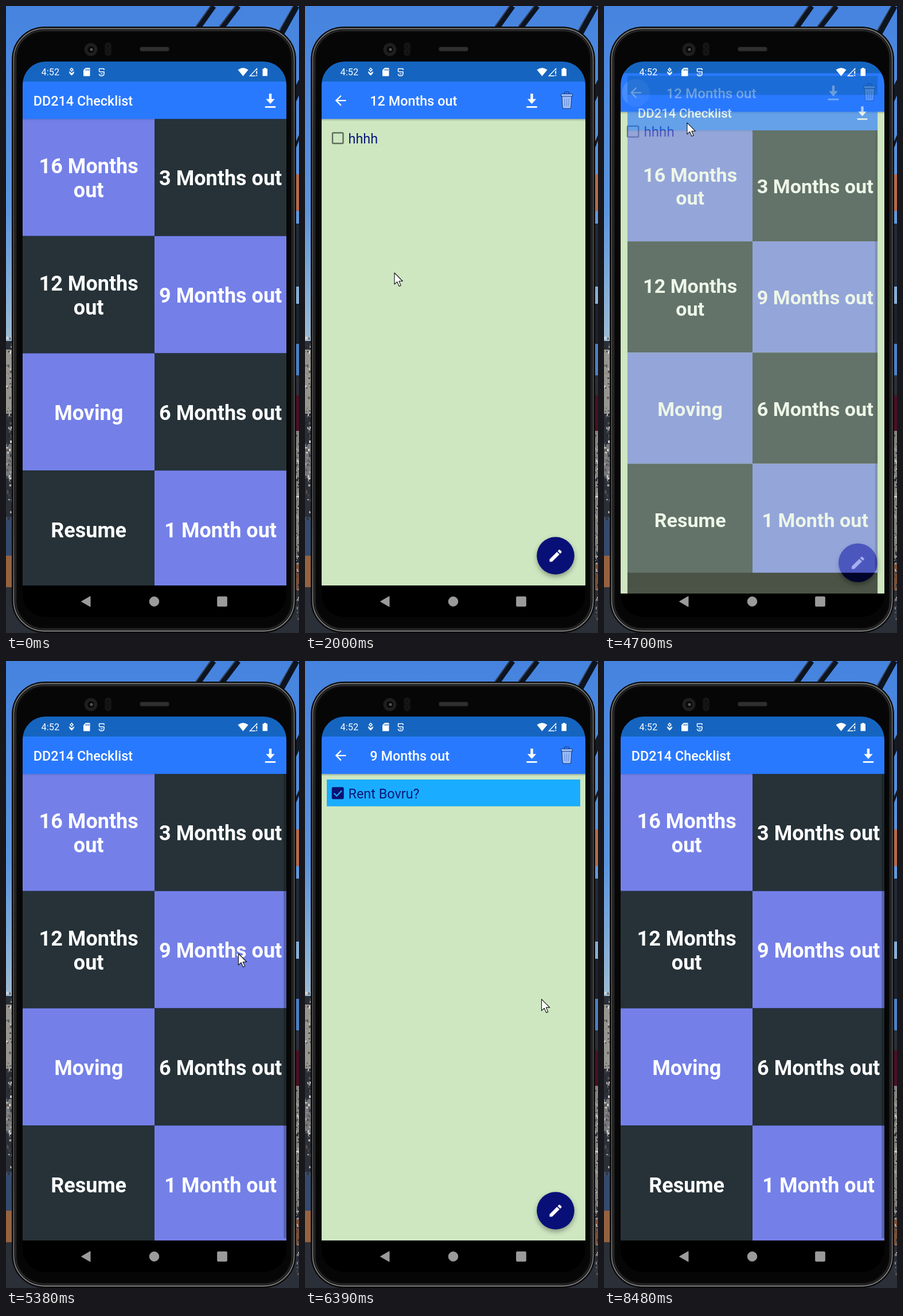
Write an HTML page that moves like this. It is 511 px wide and 1095 px high and loops after 9150 ms.

```html
<!DOCTYPE html>
<html lang="en">
<head>
<meta charset="utf-8">
<title>Checklist demo</title>
<style>
  html, body { margin: 0; width: 100%; height: 100%; overflow: hidden; background: #0a0a0a; }
  svg { display: block; width: 100vw; height: 100vh; }
  text { font-family: Roboto, sans-serif; fill: #fff; }
  .title { font-size: 23.4px; font-weight: 500; }
  .cell { font-size: 36px; font-weight: 700; text-anchor: middle; }
  .item { font-size: 23.4px; fill: #0a1779; }
  .screen { transform-origin: 259px 582px; }
  .raise { filter: drop-shadow(0 2px 1.5px rgba(0, 0, 0, .4)); opacity: 0; }
  .ripple { fill: #fff; fill-opacity: .14; }
  .fab { filter: drop-shadow(0 4px 4px rgba(0, 0, 0, .35)); }
</style>
</head>
<body>
<svg viewBox="0 0 511 1095" preserveAspectRatio="none">
  <defs>
    <linearGradient id="sky" x2="0" y2="1">
      <stop offset="0" stop-color="#4583df"/>
      <stop offset=".6" stop-color="#5b95de"/>
      <stop offset="1" stop-color="#9dbbd2"/>
    </linearGradient>
    <linearGradient id="shade" x2="0" y2="1">
      <stop offset="0" stop-opacity=".22"/>
      <stop offset="1" stop-opacity="0"/>
    </linearGradient>
    <linearGradient id="rim" x2="0" y2="1">
      <stop offset="0" stop-color="#777"/>
      <stop offset=".2" stop-color="#555"/>
      <stop offset=".8" stop-color="#555"/>
      <stop offset="1" stop-color="#858585"/>
    </linearGradient>
    <clipPath id="glass"><rect x="29" y="97" width="460" height="970" rx="40"/></clipPath>

    <path id="download" fill="#fff" d="M-2.2-12.5H2.2V-3H7.6L0 5.6-7.6-3H-2.2zM-9.2 9.6H9.2V12.2H-9.2z"/>

    <g id="bars">
      <rect x="29" y="97" width="460" height="35.5" fill="#1565c0"/>
      <rect x="29" y="132" width="460" height="65.3" fill="#2979ff"/>
      <rect x="29" y="1012" width="460" height="56" fill="#000"/>
    </g>

    <g id="trash" fill="#9dbffb" stroke="#183a78" stroke-width="1.1" stroke-linejoin="round">
      <path d="M-4-11.5V-13.5Q-4-15-2.5-15H2.5Q4-15 4-13.5V-11.5" fill="none"/>
      <path d="M-8.5-7.5H8.5L7.4 11.5Q7.2 14 5 14H-5Q-7.2 14-7.4 11.5z"/>
      <rect x="-10" y="-11.5" width="20" height="4.5" rx="2"/>
      <path d="M-3.8-3.5L-3.3 10M0-3.5V10M3.8-3.5L3.3 10" fill="none" stroke="#5f8ad6"/>
    </g>

    <g id="listBase">
      <rect x="29" y="190" width="460" height="823" fill="#cee7c1"/>
      <use href="#bars"/>
      <rect x="29" y="197.3" width="460" height="4" fill="url(#shade)"/>
      <path transform="translate(48 151) scale(1.171)" fill="#fff"
        d="M20 11H7.83l5.59-5.59L12 4l-8 8 8 8 1.41-1.41L7.83 13H20z"/>
      <use href="#download" x="395.5" y="165.5"/>
      <use href="#trash" x="456.5" y="165"/>
      <circle class="fab" cx="437" cy="960" r="32.8" fill="#081077"/>
      <path transform="translate(423 946) scale(1.171)" fill="#fff"
        d="M3 17.25V21h3.75L17.81 9.94l-3.75-3.75zM20.71 7.04c.39-.39.39-1.02 0-1.41l-2.34-2.34c-.39-.39-1.02-.39-1.41 0l-1.83 1.83 3.75 3.75z"/>
    </g>
  </defs>

  <!-- backdrop -->
  <rect width="511" height="1095" fill="#2a2f38"/>
  <rect width="511" height="585" fill="url(#sky)"/>
  <path d="M362 0L335 38M405 0L376 38M507 0L476 56" stroke="#0d1420" stroke-width="10"/>
  <path d="M357 0L330 38M400 0L371 38M501 0L471 52" stroke="#3c4658" stroke-width="1.5"/>
  <path d="M500 150L511 128V156L500 180zM500 250L511 225V235L500 262z" fill="#141a26"/>
  <rect x="500" y="294" width="11" height="64" fill="#b4694b"/>
  <rect x="500" y="380" width="11" height="110" fill="#222a3a"/>
  <rect x="500" y="520" width="11" height="70" fill="#1b2230"/>
  <rect x="500" y="590" width="11" height="55" fill="#4b80c8"/>
  <rect x="500" y="680" width="11" height="62" fill="#4a1024"/>
  <rect x="500" y="742" width="11" height="220" fill="#85857f"/>
  <rect x="500" y="975" width="11" height="45" fill="#7d5139"/>
  <rect y="600" width="12" height="112" fill="#97958f"/>
  <rect y="765" width="12" height="60" fill="#78797b"/>
  <rect y="892" width="12" height="68" fill="#354a6c"/>
  <rect y="960" width="13" height="55" fill="#96623f"/>
  <g id="specks"></g>

  <!-- phone body -->
  <rect x="10.5" y="36.5" width="495" height="1058" rx="56" fill="#101010" stroke="#050505"/>
  <rect x="13.5" y="39.5" width="489" height="1052" rx="53" fill="none" stroke="url(#rim)" stroke-width="1.8"/>
  <rect x="17" y="43" width="482" height="1045" rx="49" fill="#090909" stroke="#2b2b2b" stroke-width="2"/>
  <rect x="21" y="47" width="474" height="1037" rx="46" fill="#060606"/>
  <circle cx="148" cy="76" r="11.5" fill="#1d1d1d"/>
  <circle cx="148" cy="76" r="7" fill="#0a0a0a" stroke="#303030"/>
  <circle cx="149" cy="76" r="2.5" fill="#565656"/>
  <rect x="172" y="63" width="12" height="25" rx="6" fill="#111"/>
  <circle cx="178" cy="70" r="4" fill="none" stroke="#1f1f1f"/>
  <circle cx="178" cy="81" r="4" fill="none" stroke="#1f1f1f"/>
  <rect x="233.5" y="71.5" width="51" height="7.5" rx="3" fill="#2f2f2f" stroke="#191919"/>

  <g clip-path="url(#glass)">
    <rect x="29" y="97" width="460" height="970"/>
    <g id="stage">
      <g id="list12" class="screen">
        <use href="#listBase"/>
        <circle class="ripple" cx="62" cy="165"/>
        <text class="title" x="113.3" y="174.3">12 Months out</text>
        <rect x="48" y="221.5" width="18.5" height="18.5" rx="1.5" fill="none" stroke="#5f6d5c" stroke-width="2.4"/>
        <text class="item" x="75.5" y="239.5">hhhh</text>
      </g>
      <g id="list9" class="screen">
        <use href="#listBase"/>
        <circle class="ripple" cx="62" cy="165"/>
        <text class="title" x="113.3" y="174.3">9 Months out</text>
        <rect x="38" y="207" width="442" height="46.8" fill="#1aadff"/>
        <rect x="46.7" y="220.2" width="21" height="21" rx="2.3" fill="#0a1172"/>
        <path d="M50.5 231L55.2 235.7 64 226.5" fill="none" stroke="#1aadff" stroke-width="2.3"/>
        <text class="item" x="75.5" y="239.5">Rent Bovru?</text>
      </g>
      <g id="home" class="screen">
        <g id="cells"></g>
        <use href="#bars"/>
        <rect x="29" y="197.3" width="460" height="3" fill="url(#shade)" opacity=".6"/>
        <text class="title" x="47.7" y="174.3">DD214 Checklist</text>
        <use href="#download" x="461" y="165.5"/>
        <rect id="scrollbar" x="484.3" y="197" width="4.7" height="811" fill="#000" fill-opacity=".24"/>
      </g>
    </g>
  </g>

  <!-- system icons -->
  <g fill="#fff">
    <text x="61.5" y="121" font-size="16.4">4:52</text>
    <g fill="none" stroke="#fff" stroke-width="1.5">
      <path d="M114.5 108.5L117 111.2 114.5 114 112 111.2zM110.5 114.5Q111 118 114.5 120.5 118 118 118.5 114.5M112 116L114.5 118.5 117 116"/>
      <path d="M162.5 109.5H171M162.5 109.5V113Q162.5 115 164.5 115H171V118Q171 122 166.7 122T162.5 118.5M171 109.5V112M165 118.5H168.5"/>
    </g>
    <path d="M139 108H145.5Q146.500 108 146.500 109V121.500Q146.500 122.500 145.500 122.500H136Q135 122.500 135 121.500V112z"/>
    <path d="M139.5 110V113M142 110V113M144.5 110V113" stroke="#1565c0" stroke-width="1.2"/>
    <path d="M404.5 111.5Q413.5 104.5 422.5 111.5L413.5 122.5z"/>
    <path d="M435 122H425.5L437.5 109.5V112" fill="none" stroke="#fff" stroke-width="1.4"/>
    <path d="M436.2 113.5H438.2V118.5H436.2zM436.2 120.2H438.2V122.3H436.2z"/>
    <path d="M450 108H453.5V109.5H456V122.3H447.5V109.5H450z"/>
  </g>
  <g fill="#9b9b9b" stroke="#9b9b9b" stroke-linejoin="round">
    <path d="M131.5 1040L147 1031V1049z"/>
    <circle cx="258.5" cy="1040" r="8.3"/>
    <rect x="368.7" y="1031.7" width="16.6" height="16.6" rx="1"/>
  </g>

  <path id="cursor" fill="#fff" stroke="#111" stroke-width="1.1" stroke-linejoin="round"
    d="M0 0V20L4.7 15.7 8.2 23.5 11.3 22.1 7.9 14.5H14.3z"/>
</svg>

<script type="module">
const LOOP = 9150, TICK = 66.7;
const $ = id => document.getElementById(id);
const clamp = (v, lo = 0, hi = 1) => Math.min(hi, Math.max(lo, v));

function add(parent, tag, attrs, text) {
  const el = document.createElementNS('http://www.w3.org/2000/svg', tag);
  for (const k in attrs) el.setAttribute(k, attrs[k]);
  if (text) el.textContent = text;
  return parent.appendChild(el);
}

// Home grid
const labels = [['16 Months|out', '3 Months out'], ['12 Months|out', '9 Months out'],
  ['Moving', '6 Months out'], ['Resume', '1 Month out']];
const cellBox = (r, c) => ({
  x: 29 + c * 230, y: 197 + r * 204.75, width: 230, height: 204.75,
  fill: (r + c) % 2 ? '#263238' : '#7480e8'
});
const grid = $('cells');
labels.forEach((row, r) => row.forEach((_, c) => add(grid, 'rect', cellBox(r, c))));
const raised = [0, 1].map(c => add(grid, 'rect', { ...cellBox(1, c), class: 'raise' }));
labels.forEach((row, r) => row.forEach((label, c) => {
  const lines = label.split('|');
  lines.forEach((line, i) => add(grid, 'text', {
    class: 'cell', x: 144.2 + c * 230, y: 313 + r * 205 + (i - (lines.length - 1) / 2) * 42
  }, line));
}));

// Rubble in the backdrop
let seed = 7;
const rnd = () => (seed = seed * 16807 % 2147483647) / 2147483647;
const tones = ['#d8d6d0', '#23262c', '#5b5450', '#a9a7a2', '#353c48'];
for (let i = 0; i < 190; i++) {
  const left = i % 2;
  add($('specks'), 'rect', {
    x: left ? rnd() * 10 : 503 + rnd() * 7,
    y: left ? 577 + rnd() * 320 : 745 + rnd() * 330,
    width: 1 + rnd() * 3, height: 1 + rnd() * 4, fill: tones[Math.floor(rnd() * 5)]
  });
}

const bursts = [0, 250, 1050, 1660, 2200, 3150, 4080, 4420, 5380, 6320, 7270, 8210];
function snap(t) {
  const start = bursts.filter(b => b <= t + 5).pop();
  return start + Math.floor((t - start + 5) / TICK) * TICK;
}

// Time, x, y of the pointer tip
const track = [
  [183, 460, 1130], [250, 436, 1078], [320, 400, 960], [400, 330, 780], [500, 240, 600],
  [600, 180, 500], [730, 156, 466], [2133, 156, 466], [2270, 190, 545], [2400, 275, 710],
  [2530, 350, 846], [2660, 440, 790], [2800, 497, 560], [2930, 440, 262], [3080, 484, 183],
  [3150, 480, 182], [3283, 450, 181], [3500, 330, 186], [3720, 120, 200], [3870, 0, 190],
  [4000, 38, 171], [4270, 52, 157], [4400, 52, 157], [4687, 145, 204], [5000, 280, 360],
  [5320, 400, 505], [5500, 416, 523], [6300, 416, 523], [6450, 410, 640], [6650, 388, 880],
  [6850, 340, 560], [7000, 345, 380], [7200, 290, 262], [7537, 77, 135], [7670, 57, 160],
  [7930, 57, 160], [8137, 140, 380], [8340, 230, 800], [8470, 260, 1110]
];
function pointer(t) {
  const next = track.findIndex(k => k[0] > t);
  if (next < 1) return track.at(next).slice(1);
  const a = track[next - 1], b = track[next], f = (t - a[0]) / (b[0] - a[0]);
  return [a[1] + (b[1] - a[1]) * f, a[2] + (b[2] - a[2]) * f];
}

// Two joined cubics: quick start, very slow finish
const cubic = ([a, b, c, d], u) =>
  a * (1 - u) ** 3 + 3 * b * u * (1 - u) ** 2 + 3 * c * u * u * (1 - u) + d * u ** 3;
function ease(x) {
  const [xs, ys] = x < 1 / 6
    ? [[0, .05, .13333, 1 / 6], [0, 0, .06, .4]]
    : [[1 / 6, .20833, .25, 1], [.4, .82, 1, 1]];
  let lo = 0, hi = 1;
  for (let i = 0; i < 24; i++) {
    const mid = (lo + hi) / 2;
    if (cubic(xs, mid) < x) lo = mid; else hi = mid;
  }
  return cubic(ys, lo);
}

const visits = [[-9000, 'home'], [1613, 'list12'], [4605, 'home'], [5965, 'list9'], [8095, 'home']];
const screens = ['home', 'list12', 'list9'];
let front = 'home';

function place(id, scale, alpha) {
  const s = $(id).style;
  s.display = alpha > 0 ? '' : 'none';
  s.transform = scale === 1 ? 'none' : `scale(${scale})`;
  s.opacity = alpha;
}

function ripple(id, t, start) {
  $(id).querySelector('.ripple').setAttribute('r', 23.4 * clamp((t - start) / 180));
}

function draw(time) {
  const t = snap(time);
  const n = visits.filter(v => v[0] <= t).length - 1;
  const [start, id] = visits[n], age = t - start;
  if (id !== front) $('stage').append($(front = id));

  const moving = age < 340;
  const p = moving ? ease(age / 400) : 1;
  for (const s of screens) {
    if (s === id) place(s, .85 + .15 * p, moving ? clamp((age - 50) / 50) : 1);
    else if (moving && s === visits[n - 1][1]) place(s, 1 + .05 * p, 1);
    else place(s, 1, 0);
  }

  $('scrollbar').style.opacity = n ? clamp((1450 - age) / 250) : 0;
  raised[0].style.opacity = t < 2100 ? clamp((t - 980) / 200) : 0;
  raised[1].style.opacity = t < 6500 ? clamp((t - 5560) / 200) : 0;
  ripple('list12', t, 4370);
  ripple('list9', t, 7860);

  const [x, y] = pointer(t);
  $('cursor').setAttribute('transform', `translate(${x} ${y})`);
}

const begin = performance.now();
function frame() {
  draw((performance.now() - begin) % LOOP);
  requestAnimationFrame(frame);
}
frame();
</script>
</body>
</html>
```
